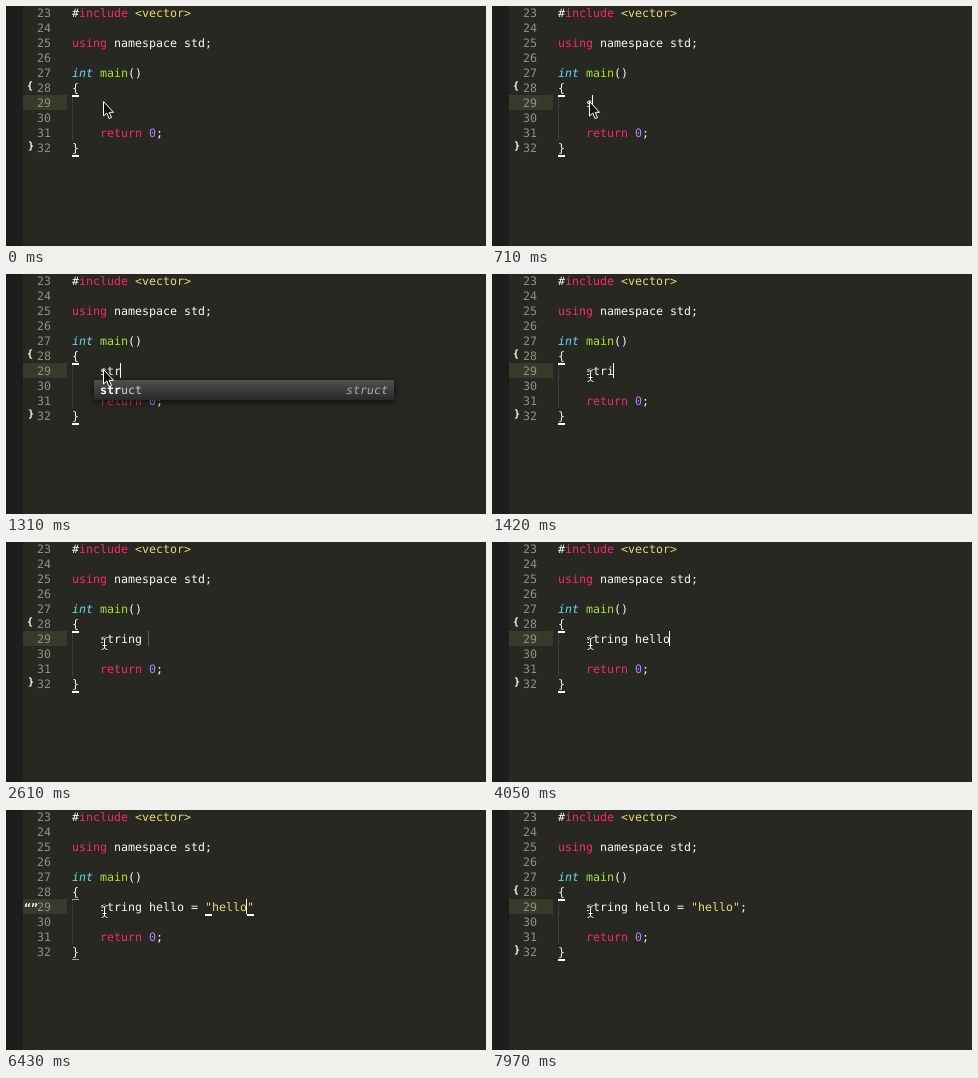
An HTML page with a canvas that plays this animation: 480x240 px, repeating every 8 s.

```html
<!DOCTYPE html>
<html lang="en">
<head>
<meta charset="utf-8">
<title>Typing in a code editor</title>
<style>
html, body { margin: 0; width: 100%; height: 100%; overflow: hidden; background: #272822; }
canvas { display: block; }
</style>
</head>
<body>
<canvas id="stage" width="480" height="240"></canvas>
<script>
const ctx = document.getElementById('stage').getContext('2d');
ctx.textRendering = 'geometricPrecision';

const LOOP = 8000, CHAR = 7, LEFT = 66, INDENT = 94;
const FAMILY = '"DejaVu Sans Mono", monospace';
const WHITE = '#f8f8f2', PINK = '#f92672', BLUE = '#66d9ef', GREEN = '#a6e22e',
      YELLOW = '#e6db74', PURPLE = '#ae81ff';

// Typing steps: start time, text, caret column, caret opacity
const steps = [
  [0, '', 0, 0], [360, '', 0, 1], [710, 's', 1, 1], [1070, 'st', 2, 1],
  [1310, 'str', 3, 1], [1420, 'stri', 4, 1], [1540, 'string', 6, 1],
  [1660, 'string ', 7, 1], [2010, 'string ', 7, .6], [2130, 'string ', 7, .2],
  [2250, 'string ', 7, 0], [2610, 'string ', 7, .25], [2730, 'string he', 9, 1],
  [2850, 'string hel', 10, 1], [3090, 'string hell', 11, 1],
  [3450, 'string hell', 11, .4], [3570, 'string hell', 11, 0],
  [4050, 'string hello', 12, 1], [4170, 'string hello ', 13, 1],
  [4530, 'string hello ', 13, .5], [4650, 'string hello =', 14, 1],
  [4890, 'string hello = ', 15, 1], [5250, 'string hello = ""', 16, 1],
  [5610, 'string hello = ""', 16, .6], [5730, 'string hello = "h"', 17, 1],
  [5840, 'string hello = "he"', 18, 1], [5960, 'string hello = "hel"', 19, 1],
  [6190, 'string hello = "hell"', 20, 1], [6430, 'string hello = "hello"', 21, 1],
  [6790, 'string hello = "hello"', 21, .6], [6910, 'string hello = "hello"', 21, .2],
  [7020, 'string hello = "hello"', 21, 0], [7140, 'string hello = "hello"', 22, 1],
  [7380, 'string hello = "hello";', 23, 1], [7730, 'string hello = "hello";', 23, .6],
  [7850, 'string hello = "hello";', 23, .2], [7970, 'string hello = "hello";', 23, 0]
];

const rowTop = line => 89 + (line - 29) * 15;
const within = (t, from, to) => t >= from && t < to;

function box(x, y, w, h, color) {
  ctx.fillStyle = color;
  ctx.fillRect(x, y, w, h);
}

function write(text, x, y, color, style = '', size = 11.63) {
  ctx.font = `${style} ${size}px ${FAMILY}`;
  ctx.fillStyle = color;
  ctx.fillText(text, x, y);
}

// Draws consecutive [text, color, style] runs on a line
function code(line, x, ...runs) {
  for (const [text, color, style] of runs) {
    write(text, x, rowTop(line) + 12, color, style);
    x += text.length * CHAR;
  }
}

function drawEditor() {
  box(0, 0, 480, 240, '#272822');
  box(0, 0, 17, 240, '#1d1d1d');
  box(17, 89, 44, 15, '#383a2a');
  for (let line = 23; line <= 32; line++) code(line, 31, [String(line), '#8f908a']);
  for (let y = 90; y < 134; y += 2) box(66, y, 1, 1, '#55564d');
  code(23, LEFT, ['#', WHITE], ['include', PINK], [' <vector>', YELLOW]);
  code(25, LEFT, ['using', PINK], [' namespace std;', WHITE]);
  code(27, LEFT, ['int', BLUE, 'italic'], [' main', GREEN], ['()', WHITE]);
  code(28, LEFT, ['{', WHITE]);
  code(31, INDENT, ['return', PINK], [' 0', PURPLE], [';', WHITE]);
  code(32, LEFT, ['}', WHITE]);
}

function drawBrackets(inString, text) {
  const thickness = inString ? 1 : 2;
  for (const line of [28, 32]) box(LEFT, rowTop(line + 1), 7, thickness, inString ? '#a5a69f' : '#fff');
  if (inString) {
    write('“”', 18, 102, '#fff', 'bold', 11.63);
    for (const col of [text.indexOf('"'), text.lastIndexOf('"')])
      box(INDENT + col * CHAR, 104, 7, 2, '#fff');
  } else {
    write('{', 21, 83, '#fff', 'bold', 10);
    write('}', 22, 143, '#fff', 'bold', 10);
  }
}

function drawPopup(typed) {
  ctx.save();
  ctx.shadowColor = 'rgba(0,0,0,.7)';
  ctx.shadowBlur = 7;
  ctx.shadowOffsetY = 2;
  const shade = ctx.createLinearGradient(0, 106, 0, 126);
  shade.addColorStop(0, '#505050');
  shade.addColorStop(1, '#292929');
  box(88, 106, 300, 20, shade);
  ctx.restore();
  write(typed, INDENT, 120, '#fff', 'bold');
  write('struct'.slice(typed.length), INDENT + typed.length * CHAR, 120, '#d0d0d0');
  write('struct', 340, 120, '#a8a8a8', 'italic');
}

function drawArrow() {
  const shape = new Path2D('M97.5 95.5V110L100.8 107L103 112.5L105.5 111.5L103.2 106.3H107.5Z');
  ctx.fillStyle = '#111';
  ctx.fill(shape);
  ctx.strokeStyle = '#fff';
  ctx.lineWidth = 1;
  ctx.stroke(shape);
}

function drawIBeam() {
  const shape = new Path2D('M95.5 95.5Q98.5 95.5 98.5 98V105Q98.5 107.5 95.5 107.5M101.5 95.5Q98.5 95.5 98.5 98M98.5 105Q98.5 107.5 101.5 107.5M96.5 103.5H100.5');
  for (const [width, color] of [[2.6, '#111'], [1, '#fff']]) {
    ctx.lineWidth = width;
    ctx.strokeStyle = color;
    ctx.stroke(shape);
  }
}

function draw(t) {
  const [, text, column, opacity] = steps.findLast(step => step[0] <= t);
  const quote = text.indexOf('"');
  const end = quote < 0 ? text.length : quote;
  const close = quote < 0 ? end : text.lastIndexOf('"') + 1;

  drawEditor();
  drawBrackets(within(t, 5840, 7140), text);
  code(29, INDENT, [text.slice(0, end), WHITE], [text.slice(end, close), YELLOW], [text.slice(close), WHITE]);
  box(INDENT - 1 + column * CHAR, 89, 1, 15, `rgba(248,248,240,${opacity})`);
  if (within(t, 830, 1420)) drawPopup(text);
  if (t < 1420) drawArrow(); else drawIBeam();
}

function tick() {
  draw(performance.now() % LOOP);
  requestAnimationFrame(tick);
}
tick();
</script>
</body>
</html>
```
